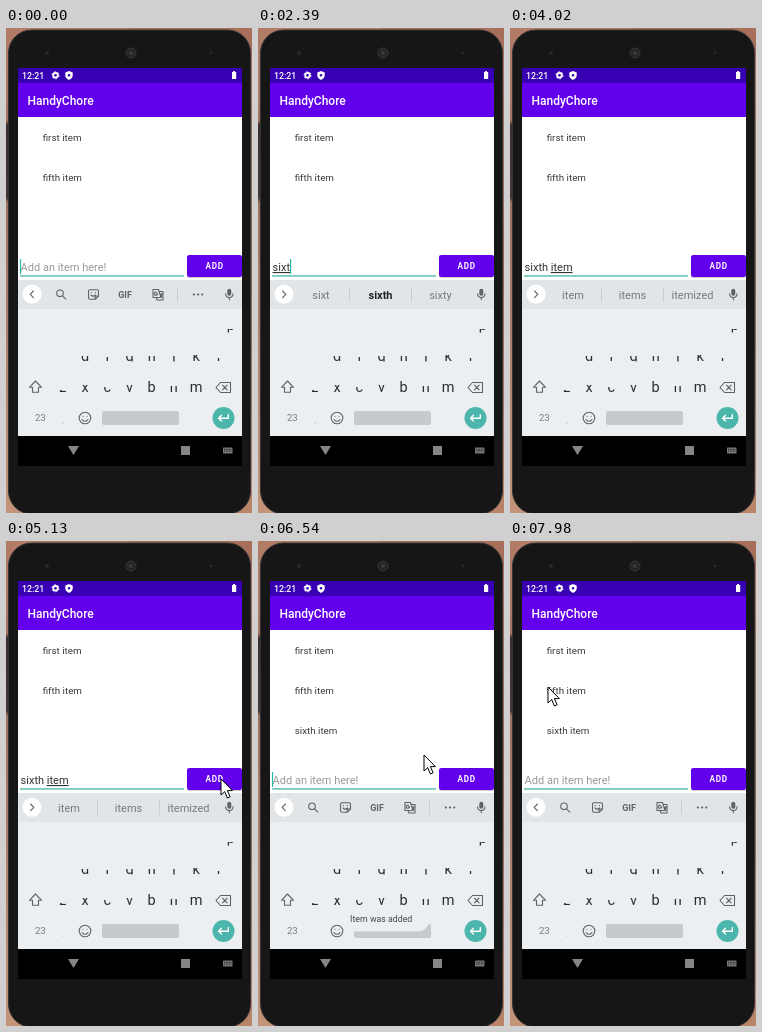
Animation of 246 by 485 pixels, one loop 8000 ms. Source, as an HTML page:

```html
<!DOCTYPE html>
<html lang="en">
<head>
<meta charset="utf-8">
<title>To-do list on a phone</title>
<style>
  html, body { margin: 0; width: 100%; height: 100%; overflow: hidden; background: #161616; }
  svg { display: block; width: 100vw; height: 100vh; }
  text { font-family: Roboto, "Noto Sans", sans-serif; white-space: pre; }
  .mid { text-anchor: middle; }
  .item { font-size: 9.8px; fill: #3c3c3c; }
  .entry { font-size: 11px; }
  .word { font-size: 11px; fill: #757a7e; }
  .bold { font-weight: 700; fill: #202124; }
  .key { font-size: 14.5px; fill: #2b2f33; text-anchor: middle; }
  .line { fill: none; stroke: #5f6368; stroke-width: 1.1; stroke-linecap: round; stroke-linejoin: round; }
  .typing { text-decoration: underline; text-decoration-thickness: .6px; text-underline-offset: 1.6px; }
</style>
</head>
<body>
<svg viewBox="0 0 246 485" preserveAspectRatio="none">
  <defs>
    <linearGradient id="wood" x2="0" y2="1">
      <stop offset="0" stop-color="#b27c66"/>
      <stop offset=".19" stop-color="#a57561"/>
      <stop offset=".2" stop-color="#39302e"/>
      <stop offset=".35" stop-color="#413734"/>
      <stop offset=".36" stop-color="#9b7060"/>
      <stop offset="1" stop-color="#c39478"/>
    </linearGradient>
    <linearGradient id="side" x2="0" y2="1">
      <stop offset="0" stop-color="#a8705b"/>
      <stop offset=".5" stop-color="#8d6454"/>
      <stop offset="1" stop-color="#b98468"/>
    </linearGradient>
  </defs>

  <!-- phone -->
  <rect width="123" height="485" fill="url(#wood)"/>
  <rect x="123" width="123" height="485" fill="url(#side)"/>
  <rect x="2.5" y="2" width="242" height="484" rx="23" fill="#161616" stroke="#343434"/>
  <circle cx="41" cy="25" r="2" fill="#292929"/>
  <circle cx="125" cy="25" r="5" fill="#242424" stroke="#383838"/>
  <circle cx="125" cy="25" r="2" fill="#3c3c3c"/>
  <circle cx="205" cy="25" r="1.3" fill="#292929"/>

  <!-- status and title bars -->
  <rect x="12" y="40" width="224" height="212" fill="#fff"/>
  <rect x="12" y="40" width="224" height="15" fill="#3700b3"/>
  <rect x="12" y="55" width="224" height="34" fill="#6200ee"/>
  <text x="16" y="50.5" font-size="8.8" font-weight="500" fill="#fff">12:21</text>
  <circle cx="49.5" cy="47.3" r="2.3" fill="none" stroke="#fff" stroke-width="1.8"/>
  <circle cx="49.5" cy="47.3" r="3.5" fill="none" stroke="#fff" stroke-dasharray="1.8 1.865"/>
  <path d="M63 43l3.7 1.4v2.9q0 3-3.7 4.6q-3.7-1.6-3.7-4.6v-2.9z" fill="#fff"/>
  <circle cx="63" cy="47.2" r="1.2" fill="#3700b3"/>
  <path d="M226 44h1.2v-1h1.8v1h1.2v7h-4.2z" fill="#fff"/>
  <text x="21.5" y="76.7" font-size="12" font-weight="500" fill="#fff">HandyChore</text>

  <!-- list -->
  <text class="item" x="36.7" y="113">first item</text>
  <text class="item" x="36.7" y="153">fifth item</text>
  <text class="item" id="added" x="36.7" y="193">sixth item</text>

  <!-- entry row -->
  <text class="entry" id="hint" x="14.6" y="243" fill="#999">Add an item here!</text>
  <text class="entry" id="entry" x="14.6" y="243" fill="#333"><tspan id="done"></tspan><tspan id="typing" class="typing"></tspan></text>
  <rect x="14" y="247.3" width="164" height="1.3" fill="#48b5aa"/>
  <rect id="caret" y="231" width="1.2" height="15" fill="#25b9aa"/>
  <rect x="181" y="228" width="55" height="22" rx="2.2" fill="#000" opacity=".2"/>
  <rect x="181" y="227" width="55" height="22" rx="2.2" fill="#6200ee"/>
  <rect id="ripple" x="181" y="227" width="55" height="22" rx="2.2" fill="#fff"/>
  <text class="mid" x="208.7" y="241.2" font-size="8.2" font-weight="700" letter-spacing=".8" fill="#fff">ADD</text>

  <!-- keyboard -->
  <rect x="12" y="252" width="224" height="156" fill="#eceff1"/>
  <rect x="12" y="252" width="224" height="29" fill="#e1e5e8"/>
  <circle cx="26" cy="266.3" r="9.5" fill="#fff"/>
  <path id="chevron" class="line" stroke-width="1.4"/>
  <g id="tools">
    <circle class="line" cx="54" cy="265.3" r="3.3"/>
    <path class="line" d="M56.5 267.8l3.3 3.3"/>
    <path class="line" d="M84 261.7h7q1.5 0 1.5 1.5v4.8l-3.3 3.3h-5.2q-1.5 0-1.5-1.5v-6.6q0-1.5 1.5-1.5zM92.5 268h-3.3v3.3M85 267q2.2 2.3 4.4 0M85.4 264.6h.1M89.4 264.6h.1"/>
    <text class="mid" x="119" y="269.6" font-size="9" font-weight="700" fill="#5f6368">GIF</text>
    <path class="line" d="M147 261.5h5.5l2.5 8h-8zM153 263.5h4v8.5h-6l-.7-2.3M154.5 266h2M155.5 269v-3"/>
    <path class="line" d="M150.5 264.3q-2.2-.6-2.2 1.4t2.2 1.4q1.4-.4 1.2-1.4h-1.2" stroke-width=".8"/>
    <path d="M171.5 260v13.5" stroke="#c9cdd0"/>
    <path d="M187.8 266.5h.1M192 266.5h.1M196.2 266.5h.1" stroke="#5f6368" stroke-width="2.2" stroke-linecap="round"/>
  </g>
  <g id="words">
    <path d="M91.5 259v15M153.5 259v15" stroke="#c9cdd0"/>
    <text class="word mid" x="63" y="270.5"></text>
    <text class="word mid" x="122.5" y="270.5"></text>
    <text class="word mid" x="182.5" y="270.5"></text>
  </g>
  <rect x="221.3" y="260.8" width="4" height="7" rx="2" fill="#5f6368"/>
  <path class="line" d="M219.6 265.8q.2 3.8 3.7 3.8t3.7-3.8M223.3 269.6v2.2"/>

  <g id="keys"></g>
  <path class="line" stroke-width="1.3" d="M29.5 353l6 6.3h-3v5h-6v-5h-3z"/>
  <path class="line" stroke-width="1.3" d="M214.5 354.5h10v10h-10l-4.5-5zM216.5 357.2l4.6 4.6M221.1 357.2l-4.6 4.6"/>
  <text class="mid" x="34.3" y="393.4" font-size="9.6" fill="#777c80">23</text>
  <circle cx="57" cy="395" r=".5" fill="#9a9ea1"/>
  <circle class="line" cx="79" cy="390" r="5.8"/>
  <path class="line" d="M76 391.6q3 3.4 6 0M77 388.2h.1M81 388.2h.1"/>
  <rect x="96" y="383" width="77" height="14" rx="2" fill="#c6cacd"/>
  <circle cx="217.5" cy="390" r="11" fill="#4db6ac"/>
  <path class="line" style="stroke:#fff;stroke-width:1.4" d="M222.3 386.6v3.6h-9.5M215.5 387.3l-2.9 2.9l2.9 2.9"/>

  <g id="toast">
    <rect x="81.5" y="366" width="90" height="24.5" rx="12" fill="#eceff1"/>
    <text class="mid" x="123.2" y="381" font-size="8.8" fill="#44484b">Item was added</text>
  </g>

  <!-- navigation bar -->
  <rect x="12" y="408" width="224" height="30" fill="#000"/>
  <path d="M62 418h11l-5.5 9z" fill="#858585"/>
  <rect x="175" y="418" width="9" height="9" fill="#858585"/>
  <rect x="217" y="419.5" width="9.5" height="6" rx=".6" fill="#777"/>
  <path d="M218.2 421.3h7.2M218.2 423h7.2" stroke="#000" stroke-width=".8" stroke-dasharray=".8 .8"/>

  <path id="pointer" d="M0 0v16l3.7-3.4l2.7 6.4l2.7-1.2l-2.7-6.2h5z" fill="#fff" stroke="#000" stroke-linejoin="round"/>
</svg>
<script>
const LOOP = 8000;
const $ = id => document.getElementById(id);
const show = (id, on) => $(id).style.display = on ? "" : "none";

// Latest row whose time has passed: [time, ...values]
const at = (rows, t) => rows.reduce((hit, row) => row[0] <= t ? row : hit);

// time, finished text, text being composed, suggestions
const typing = [
  [0, "", "", ""],
  [1840, "", "s", "s *so sorry"],
  [1990, "", "si", "si *so sir"],
  [2110, "", "six", "six sixth sixty"],
  [2390, "", "sixt", "sixt *sixth sixty"],
  [2540, "", "sixth", "sixth sixths sixty"],
  [2820, "sixth ", "", "grade and floor"],
  [3070, "sixth ", "i", "i *I it"],
  [3190, "sixth ", "it", "it *it it's"],
  [3340, "sixth ", "ite", "ite *item items"],
  [3460, "sixth ", "item", "item items itemized"],
  [5430, "", "", "item items itemized"],
  [5580, "", "", ""]
];
const caretFlips = [280, 810, 1250, 1840, 4020, 4580, 4980, 5430, 5880, 6420, 6900, 7320, 7830];
const moves = [
  [0, -40, -40], [4980, 217, 241], [5130, 215, 238],
  [6150, 213, 236], [6270, 210, 233], [6420, 194, 226], [6540, 166, 214],
  [6660, 135, 201], [6780, 102, 188], [6900, 76, 178], [7050, 56, 157],
  [7200, 46, 148], [7320, 34, 138], [7440, 17, 124], [7560, 4, 111],
  [7680, 1, 130], [7830, 23, 147], [7980, 38, 146]
];
const toast = [[0, 0], [5580, .35], [5730, .8], [5880, 1], [7560, .7], [7680, .35], [7830, 0]];
const ripple = [[0, 0], [5430, .22], [5580, .12], [5730, 0]];

// Partly drawn key labels: letters, first column, baseline, visible top of each, visible bottom
const keyRows = [
  ["p", 224.8, 302, [301], 304.5],
  ["dfghjkl", 79.2, 333, [328, 329, 328, 328, 328, 327, 330], 333.5],
  ["zxcvbnm", 56.8, 364, [362, 357, 359, 357, 350, 358, 350], 366]
];
$("keys").innerHTML = keyRows.map(([letters, x, y, tops, end], r) =>
  [...letters].map((c, i) => {
    const cx = x + i * 22.2, id = `k${r}${i}`;
    return `<clipPath id="${id}"><rect x="${cx - 9}" y="${tops[i]}" width="18" height="${end - tops[i]}"/></clipPath>
      <text class="key" x="${cx}" y="${y}" clip-path="url(#${id})">${c}</text>`;
  }).join("")).join("");

const slots = [...$("words").querySelectorAll("text")];

function draw(t) {
  const [, done, typed, words] = at(typing, t);
  $("done").textContent = done;
  $("typing").textContent = typed;
  const text = done + typed;
  show("hint", !text);
  show("words", words);
  show("tools", !words);
  $("tools").setAttribute("opacity", t >= 5580 && t < 5730 ? .4 : 1);
  words.split(" ").forEach((w, i) => {
    slots[i].textContent = w.replace("*", "");
    slots[i].classList.toggle("bold", w[0] === "*");
  });
  const open = t >= 1840 && t < 5730;
  $("chevron").setAttribute("d", open ? "M24.6 263l3.2 3.3l-3.2 3.3" : "M27.4 263l-3.2 3.3l3.2 3.3");

  show("caret", caretFlips.filter(f => f <= t).length % 2 === 0);
  $("caret").setAttribute("x", text ? 14.6 + $("entry").getComputedTextLength() : 13.9);
  show("added", t >= 5580);
  $("toast").setAttribute("opacity", at(toast, t)[1]);
  $("ripple").setAttribute("opacity", at(ripple, t)[1]);
  const [, x, y] = at(moves, t);
  $("pointer").setAttribute("transform", `translate(${x} ${y})`);
}

const start = performance.now();
function tick() {
  draw((performance.now() - start) % LOOP);
  requestAnimationFrame(tick);
}
tick();
</script>
</body>
</html>
```
